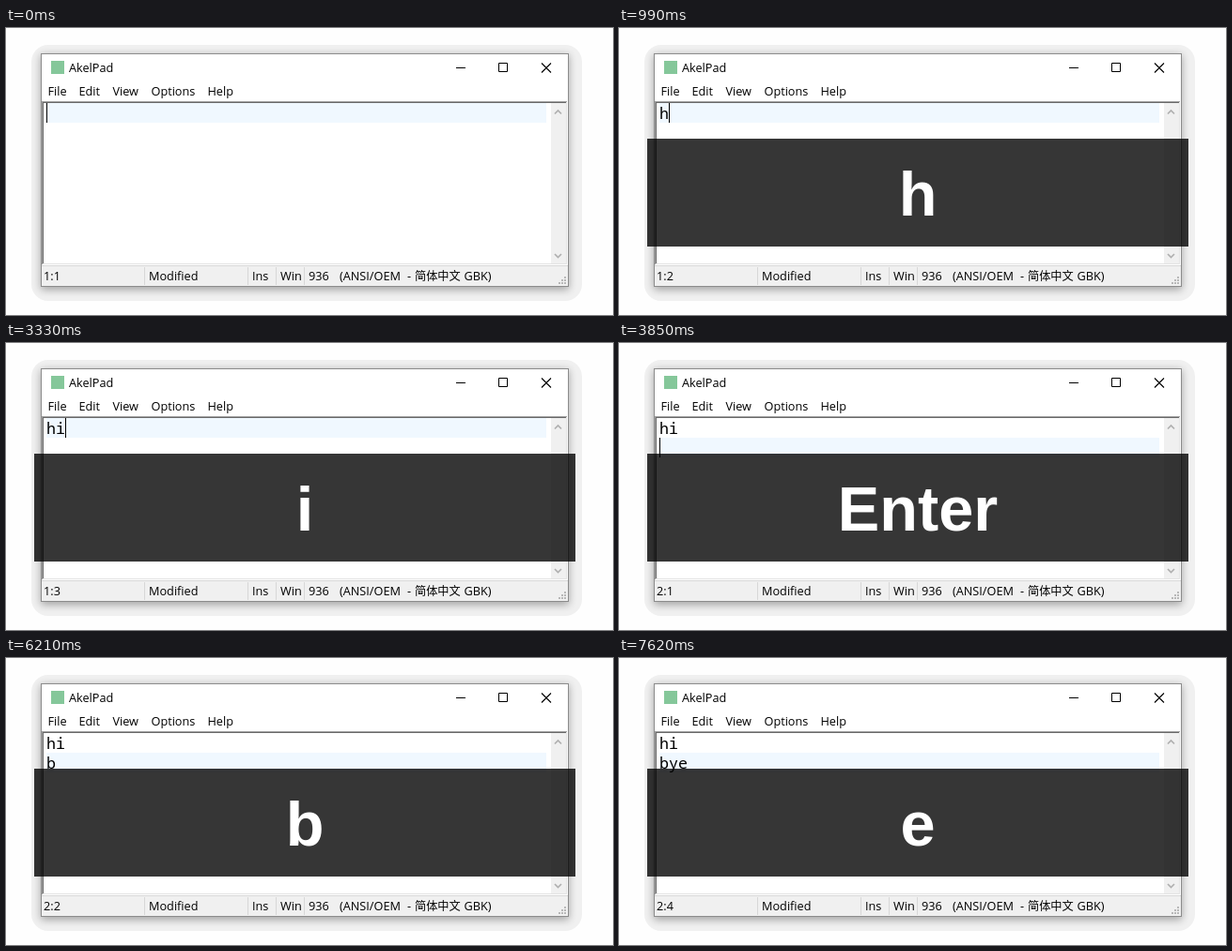
Recreate the animation shown at these times as an HTML page. Size 646 px wide and 306 px high, loop 8 s.

```html
<!DOCTYPE html>
<html lang="en">
<head>
<meta charset="utf-8">
<title>Editor with key display</title>
<style>
  html, body { margin: 0; width: 100%; height: 100%; overflow: hidden; background: #fefefe; }
  svg { display: block; width: 646px; height: 306px; }
  text { font: 12.7px "Open Sans", "Noto Sans", sans-serif; fill: #000; white-space: pre; }
  .cjk { font: 12.2px "Noto Sans CJK SC", "Noto Sans CJK", sans-serif; }
  .code { font: 16.67px "Noto Sans Mono", "DejaVu Sans Mono", monospace; }
  .key { font: bold 66.67px "Liberation Sans", Arial, sans-serif; fill: #fff; text-anchor: middle; }
  rect { shape-rendering: crispEdges; }
  .round { shape-rendering: auto; }
</style>
</head>
<body>
<svg id="stage" viewBox="0 0 646 306">
  <defs>
    <filter id="blur" x="-10%" y="-20%" width="120%" height="140%">
      <feGaussianBlur stdDeviation="4.5"/>
    </filter>
  </defs>
</svg>
<script>
const LOOP = 8000, CELL = 10, LEFT = 43, TOP = 80, ROW = 21;
const stage = document.getElementById('stage');

function add(tag, attrs, content) {
  const el = document.createElementNS('http://www.w3.org/2000/svg', tag);
  for (const name in attrs) el.setAttribute(name, attrs[name]);
  if (content) el.textContent = content;
  return stage.appendChild(el);
}
const box = (x, y, width, height, fill, more) => add('rect', { x, y, width, height, fill, ...more });
const label = (x, y, content, cls = '') => add('text', { x, y, class: cls }, content);
const stroke = (d, color, width = 1) =>
  add('path', { d, fill: 'none', stroke: color, 'stroke-width': width });

// Shadow and window
box(27, 18, 586, 273, '#f0f0f0', { rx: 18, class: 'round' });
box(37, 29, 562, 250, '#000', { opacity: 0.32, filter: 'url(#blur)', class: 'round' });
box(37, 27, 562, 249, '#8c8c8c');
box(38, 28, 560, 247, '#fff');

// Title bar
box(48, 35, 14, 14, '#85c79a');
label(67, 47, 'AkelPad');
box(479, 42, 10, 1, '#000');
stroke('M524.5 37.5h9v9h-9z', '#000');
stroke('M570 37.5l10 10M580 37.5l-10 10', '#000', 1.1);

// Menu
[[45, 'File'], [78, 'Edit'], [114, 'View'], [155, 'Options'], [215, 'Help']]
  .forEach(([x, name]) => label(x - 0.5, 72, name));

// Editor frame and scroll bar
box(38, 78, 559, 1, '#a0a0a0');
box(38, 78, 1, 174, '#a0a0a0');
box(39, 79, 557, 1, '#696969');
box(39, 79, 1, 172, '#696969');
box(39, 251, 558, 1, '#e3e3e3');
box(596, 79, 1, 172, '#e3e3e3');
box(580, 80, 16, 171, '#f0f0f0');
stroke('M584 91.5l3.5 -3.5l3.5 3.5M584 241l3.5 3.5l3.5 -3.5', '#b0b0b0', 1.7);

// Status bar
box(38, 253, 560, 22, '#f0f0f0');
box(38, 253, 560, 1, '#d7d7d7');
[147, 257, 287, 317].forEach(x => box(x, 255, 1, 19, '#d7d7d7'));
[[152, 'Modified'], [262, 'Ins'], [292, 'Win'], [322, '936'], [355, '(ANSI/OEM'], [427, '-'], [487.5, 'GBK)']]
  .forEach(([x, name]) => label(x, 269, name));
label(435, 269, '简体中文', 'cjk');
for (let r = 0; r < 3; r++)
  for (let c = 0; c <= r; c++) box(594 - 3 * c, 265 + 3 * r, 2, 2, '#b8b8b8');

// Changing parts
const active = box(LEFT, TOP, 532, ROW, '#f0f8ff');
const lines = [0, 1].map(i => label(LEFT, 96.5 + i * ROW, '', 'code'));
const caret = box(LEFT, TOP, 1, ROW, '#000');
const place = label(40, 269, '');
const shade = box(30, 118, 576, 115, '#000', { opacity: 0.79 });
const key = label(318, 200, '', 'key');

// time, typed text, key shown, times at which the caret toggles
const steps = [
  [0, '', '', [180, 710]],
  [990, 'h', 'h', [1520, 2050]],
  [2270, 'hi', 'i', [2830, 3330]],
  [3850, 'hi\n', 'Enter', [4380, 4920, 5440]],
  [5650, 'hi\nb', 'b', [6210]],
  [6500, 'hi\nby', 'y', [7030]],
  [7150, 'hi\nbye', 'e', [7620]]
];

function draw(t) {
  const [, typed, name, blinks] = steps.filter(s => s[0] <= t).pop();
  const rows = typed.split('\n');
  const row = rows.length - 1, col = rows[row].length;
  const y = TOP + row * ROW;
  lines.forEach((el, i) => el.textContent = rows[i] || '');
  active.setAttribute('y', y);
  caret.setAttribute('x', LEFT + col * CELL);
  caret.setAttribute('y', y);
  caret.style.opacity = blinks.filter(b => b <= t).length % 2 ? 0 : 1;
  place.textContent = `${row + 1}:${col + 1}`;
  shade.style.display = name ? '' : 'none';
  key.textContent = name;
}

const start = performance.now();
function tick() {
  draw((performance.now() - start) % LOOP);
  requestAnimationFrame(tick);
}
draw(0);
requestAnimationFrame(tick);
</script>
</body>
</html>
```
